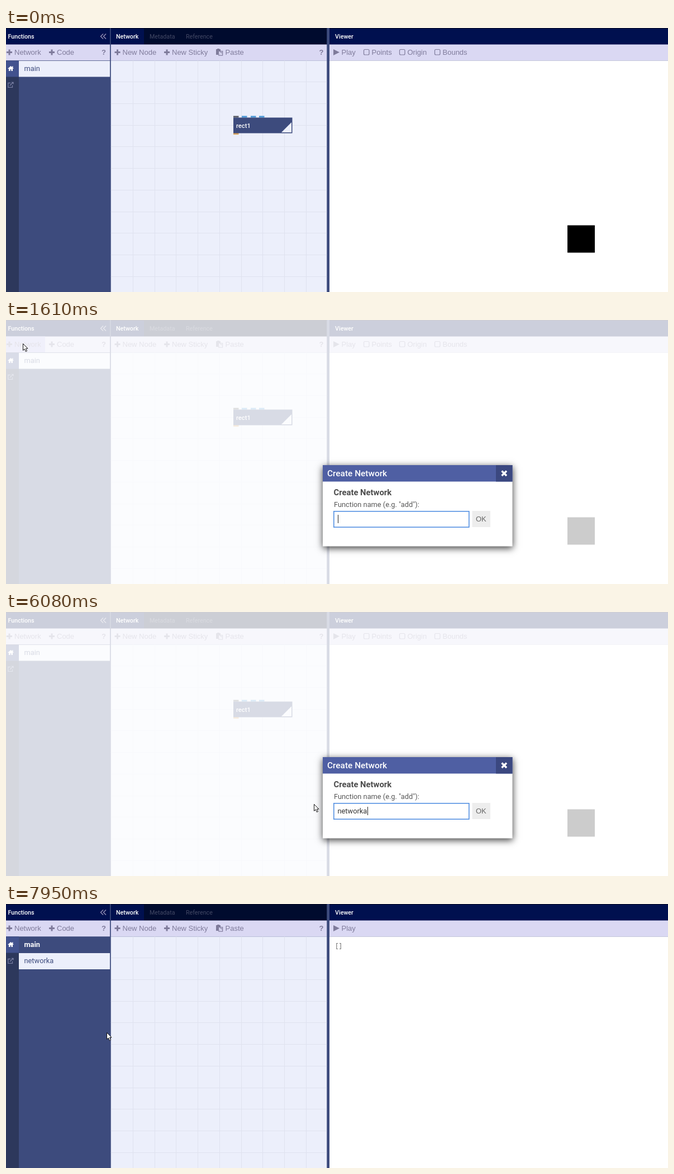
An HTML page with a canvas for the animation above (8000 ms loop, 1185x473 px).

```html
<!DOCTYPE html>
<html lang="en">
<head>
<meta charset="utf-8">
<title>Create a network</title>
<style>
html, body { margin: 0; width: 100%; height: 100%; overflow: hidden; background: #fff; }
canvas { display: block; }
</style>
</head>
<body>
<canvas id="stage" width="1185" height="473"></canvas>
<script>
const c = document.getElementById('stage').getContext('2d');
const LOOP = 8000, OPEN = 1610, CLOSE = 6540;
const NAVY = '#00104f', BLUE = '#3d4b7d', PALE = '#eceffb', BAR = '#dad8f3', GREY = '#7f7b9b';
const SANS = 'Roboto, sans-serif', ARIAL = '"Liberation Sans", Arial, sans-serif';

const NAME = 'networka';
const KEYS = [3100, 3250, 3410, 4070, 4520, 5210, 5300, 6080];
const CARET_OFF = [[2140, 2700], [3950, 4070], [5070, 5210], [5830, 6080]];

// Pointer moves: start, end, number of steps, way points
const MOVES = [
  { from: 520, to: 1290, n: 11, path: [[266, 450], [200, 345], [152, 172], [90, 100], [8, 40]] },
  { from: 1370, to: 1370, n: 1, path: [[30, 42]] },
  { from: 1690, to: 2310, n: 9, path: [[52, 55], [190, 130], [400, 260], [520, 328], [551, 344]] },
  { from: 7730, to: 7950, n: 4, path: [[510, 331], [390, 295], [250, 252], [180, 230]] }
];

function rect(x, y, w, h, fill) {
  c.fillStyle = fill;
  c.fillRect(x, y, w, h);
}

function text(s, x, y, size, fill, weight = 400, family = SANS) {
  c.font = `${weight} ${size}px ${family}`;
  c.fillStyle = fill;
  c.fillText(s, x, y);
}

function poly(points, fill) {
  c.beginPath();
  points.forEach(p => c.lineTo(...p));
  c.closePath();
  c.fillStyle = fill;
  c.fill();
}

function line(points, color, width) {
  c.beginPath();
  points.forEach(p => c.lineTo(...p));
  c.strokeStyle = color;
  c.lineWidth = width;
  c.stroke();
}

function plus(x) {
  rect(x, 42, 10, 3, GREY);
  rect(x + 3.5, 38.5, 3, 10, GREY);
}

const label = (s, x) => text(s, x, 48, 13, GREY, 400, ARIAL);
const help = x => text('?', x, 48, 13, GREY, 700, ARIAL);

function addButton(s, x) {
  plus(x);
  label(s, x + 14);
}

function checkbox(s, x) {
  c.beginPath();
  c.roundRect(x + .5, 38.5, 9.5, 9.5, 2);
  c.strokeStyle = GREY;
  c.lineWidth = 1.2;
  c.stroke();
  label(s, x + 14.5);
}

function pasteIcon() {
  rect(376, 38, 8, 10, GREY);
  rect(378, 37, 4, 2, GREY);
  rect(380, 41, 8, 9, BAR);
  c.strokeStyle = GREY;
  c.lineWidth = 1.2;
  c.strokeRect(380.8, 41.6, 6.8, 7.4);
  line([[384.5, 41.6], [384.5, 44.5], [387.6, 44.5]], GREY, 1);
}

function homeIcon() {
  poly([[8.5, 68], [14, 73], [3, 73]], '#fff');
  rect(5, 72, 7, 5, '#fff');
  rect(11, 68.5, 1.5, 3, '#fff');
  rect(7.7, 74, 1.7, 3, '#42528e');
}

function linkIcon() {
  const tone = '#757b9f';
  line([[8, 98.5], [3.8, 98.5], [3.8, 106.3], [11.5, 106.3], [11.5, 102.5]], tone, 1.3);
  line([[7, 103], [12, 98]], tone, 1.6);
  poly([[9.3, 96.7], [13.7, 96.7], [13.7, 101]], tone);
}

function functionsPanel(created, hover) {
  rect(0, 0, 186, 30, NAVY);
  text('Functions', 3.5, 18.5, 10.7, '#fff', 500);
  for (const x of [174, 179]) line([[x, 10.5], [x - 4.5, 15], [x, 19.5]], '#9390b4', 1.4);
  rect(0, 29.5, 186, 29, BAR);
  if (hover) rect(0, 29.5, 70, 28.5, '#b7b3ea');
  addButton('Network', 1);
  addButton('Code', 77);
  help(171);
  rect(0, 58.5, 188, 415, BLUE);
  rect(0, 58.5, 23, 415, '#2d385c');
  rect(0, 58.5, 23, 29, '#42528e');
  homeIcon();
  linkIcon();
  if (created) {
    text('main', 32.5, 77, 12.8, '#fff', 700);
    rect(23, 88, 163, 29, PALE);
    text(NAME, 32.5, 106, 12.8, BLUE);
  } else {
    rect(23, 59, 163, 28.5, PALE);
    text('main', 32.5, 77, 12.8, BLUE);
  }
}

function node() {
  [407, 422, 438, 453].forEach((x, i) => rect(x, 157.5, 9.5, 3, i ? '#4c98d6' : '#5a5d66'));
  rect(407, 188, 9.5, 3, '#d9a35c');
  rect(407, 160.5, 105.5, 28, BLUE);
  poly([[493, 187], [511, 169], [511, 187]], PALE);
  text('rect1', 412, 179, 11.2, '#fff', 500);
}

function networkPanel(created) {
  rect(187.5, 0, 387, 30, '#000b2e');
  rect(187.5, 0, 59.5, 30, NAVY);
  text('Network', 197, 18.5, 10.7, '#fff', 500);
  text('Metadata', 257, 18.5, 10.7, '#434965');
  text('Reference', 322, 18.5, 10.7, '#434965');
  rect(187.5, 29.5, 387, 29, BAR);
  addButton('New Node', 194.5);
  addButton('New Sticky', 283);
  pasteIcon();
  label('Paste', 392.5);
  help(560.5);
  rect(187.5, 58.5, 387, 415, PALE);
  for (let i = 0; i < 10; i++) {
    const x = Math.round(227 + i * 38.7), y = Math.round(96 + i * 38.75);
    if (i < 9) rect(x, 58.5, 1, 415, '#dfe2ef');
    rect(187.5, y, 387, 1, '#dfe2ef');
  }
  if (!created) node();
}

function viewerPanel(created) {
  rect(579, 0, 606, 30, NAVY);
  text('Viewer', 589, 18.5, 10.7, '#fff', 500);
  rect(579, 29.5, 606, 29, BAR);
  poly([[586, 38], [597, 43.5], [586, 49]], GREY);
  label('Play', 600.5);
  rect(579, 58.5, 606, 415, '#fff');
  if (created) {
    text('[]', 588.5, 79, 11.7, '#666', 400, '"Noto Sans Mono", monospace');
  } else {
    checkbox('Points', 640);
    checkbox('Origin', 704);
    checkbox('Bounds', 767);
    rect(1005, 353.5, 49, 49, '#000');
  }
}

function dialog(t) {
  rect(0, 0, 1185, 473, 'rgba(255,255,255,.8)');
  c.save();
  c.shadowColor = 'rgba(0,0,0,.75)';
  c.shadowBlur = 12;
  c.shadowOffsetY = 3;
  rect(567, 260, 339.5, 145.5, '#fff');
  c.restore();
  rect(567, 260, 339.5, 29.5, '#4f5fa3');
  rect(877, 260, 29.5, 29.5, '#3b4880');
  text('Create Network', 575, 279.5, 15.4, '#fff', 500);
  line([[887.5, 270.5], [896, 279]], '#fff', 3.4);
  line([[896, 270.5], [887.5, 279]], '#fff', 3.4);
  text('Create Network', 586.5, 313.5, 14.8, '#4c4c4c', 700);
  text('Function name (e.g. "add"):', 587, 334.5, 12.8, '#585858');
  c.strokeStyle = '#5490e2';
  c.lineWidth = 1.6;
  c.strokeRect(586.8, 342.8, 242, 28.4);
  rect(834.5, 342, 32.5, 29, '#ededed');
  text('OK', 841, 361, 13, '#666', 400, ARIAL);

  const typed = NAME.slice(0, KEYS.filter(k => k <= t).length);
  text(typed, 593.5, 361, 12.8, '#333');
  if (!CARET_OFF.some(([a, b]) => t >= a && t < b))
    rect(Math.round(593.8 + c.measureText(typed).width), 349, 1, 15, '#222');
}

function pointerAt(t) {
  const move = MOVES.filter(m => m.from <= t).pop();
  if (!move) return null;
  const { from, to, n, path } = move;
  const step = n > 1 ? Math.min(n - 1, Math.floor((t - from) / (to - from) * (n - 1) + .02)) : 0;
  const at = n > 1 ? step / (n - 1) * (path.length - 1) : 0;
  const i = Math.floor(at), a = path[i], b = path[i + 1] || a;
  return [0, 1].map(k => Math.round(a[k] + (b[k] - a[k]) * (at - i)));
}

function pointer(x, y) {
  c.save();
  c.translate(x + .5, y + .5);
  const shape = [[0, 0], [0, 12], [2.8, 9.4], [4.8, 14], [7, 13], [5, 8.6], [8.6, 8.6]];
  poly(shape, '#fff');
  line([...shape, shape[0]], '#111', 1);
  c.restore();
}

function draw(t) {
  const created = t >= CLOSE;
  rect(0, 0, 1185, 473, BLUE);
  functionsPanel(created, t >= 1370 && t < 1690);
  networkPanel(created);
  viewerPanel(created);
  rect(0, 0, 1185, 1, '#070b22');
  rect(186, 0, 1.5, 473, BLUE);
  rect(574.5, 0, 4.5, 473, BLUE);
  if (t >= OPEN && !created) dialog(t);
  if (t >= 1530 && t < OPEN) {
    c.beginPath();
    c.arc(30, 43, 11, 0, 7);
    c.fillStyle = 'rgba(232,222,70,.75)';
    c.fill();
  }
  const p = pointerAt(t);
  if (p) pointer(...p);
}

const start = performance.now();
function tick() {
  draw((performance.now() - start) % LOOP);
  requestAnimationFrame(tick);
}
tick();
</script>
</body>
</html>
```
